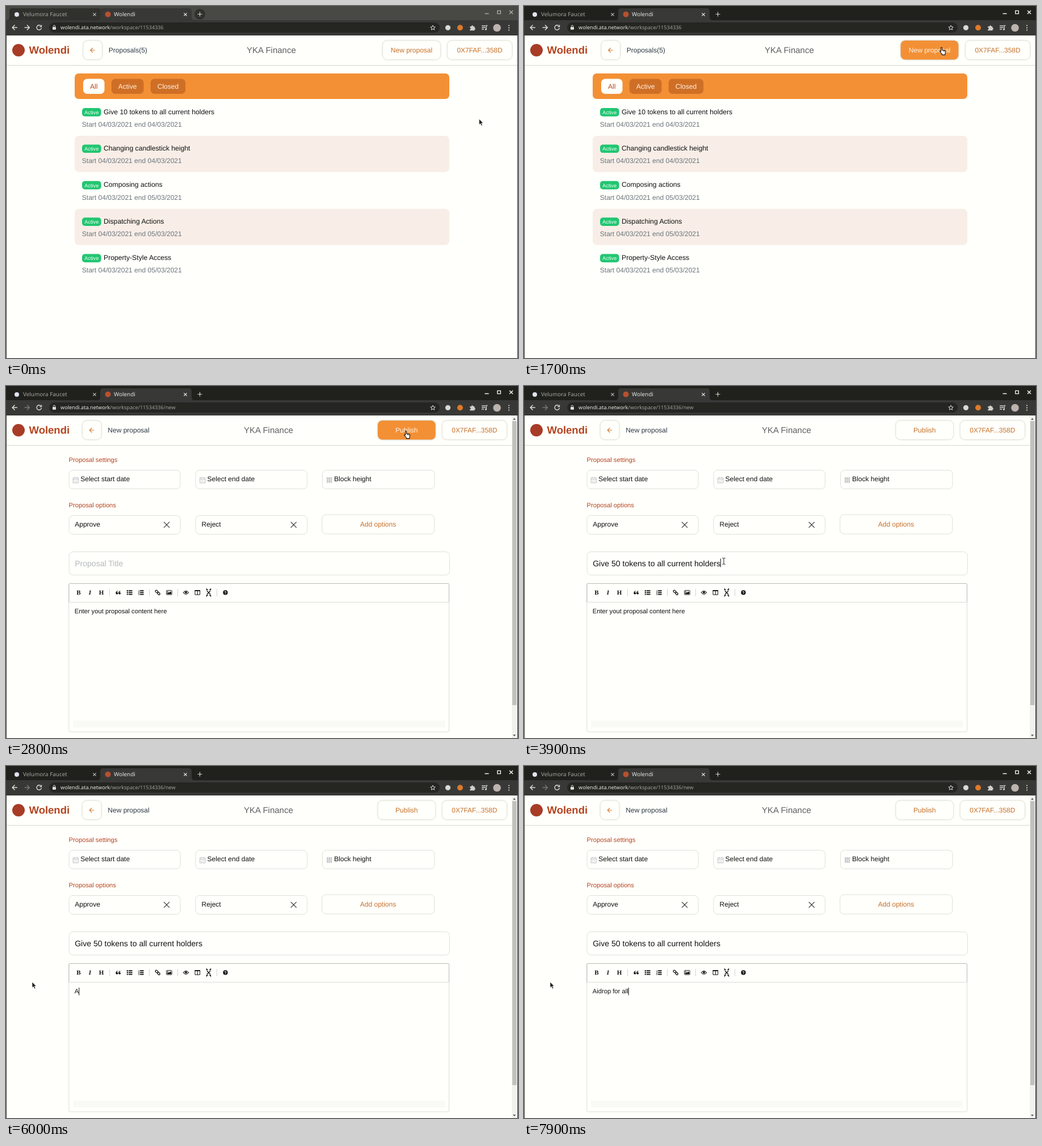
An HTML page for the animation above (8 s loop, 902 by 621 pixels).

```html
<!DOCTYPE html>
<html lang="en">
<head>
<meta charset="utf-8">
<title>Proposal workspace</title>
<style>
html, body { margin: 0; width: 100%; height: 100%; overflow: hidden; background: #fffffb; }
svg { display: block; width: 902px; height: 621px; font-family: "Liberation Sans", Arial, sans-serif; text-rendering: geometricPrecision; }
.ui { font-family: "Noto Sans", "Open Sans", sans-serif; }
.serif { font-family: "Liberation Serif", serif; font-weight: bold; }
</style>
</head>
<body>
<svg id="stage" viewBox="0 0 902 621" xmlns="http://www.w3.org/2000/svg"></svg>
<script>
const LOOP = 8000;
const PAGE = '#fffffb', RUST = '#b5431f', AMBER = '#c6702a', ORANGE = '#f39035', INK = '#111', GREY = '#6c757d';
const BRAND = 'Wolendi', WALLET = '0X7FAF...358D', ORG = 'YKA Finance';

// Drawing helpers
const rect = (x, y, w, h, r, fill, more = '') =>
  `<rect x="${x}" y="${y}" width="${w}" height="${h}" rx="${r}" fill="${fill}" ${more}/>`;
const text = (x, y, size, fill, label, more = '') =>
  `<text x="${x}" y="${y}" font-size="${size}" fill="${fill}" ${more}>${label}</text>`;
const line = (d, stroke, width = 1, more = '') =>
  `<path d="${d}" fill="none" stroke="${stroke}" stroke-width="${width}" ${more}/>`;
const shape = (d, fill, more = '') => `<path d="${d}" fill="${fill}" ${more}/>`;
const dot = (x, y, r, fill) => `<circle cx="${x}" cy="${y}" r="${r}" fill="${fill}"/>`;
const group = (id, body, more = '') => `<g id="${id}" ${more}>${body}</g>`;
const MIDDLE = 'text-anchor="middle"';

const cross = (x, y, r, color, width) =>
  line(`M${x - r} ${y - r}l${2 * r} ${2 * r}M${x + r} ${y - r}l${-2 * r} ${2 * r}`, color, width);
const arrow = (x, y, r, dir, color, width, id = '') =>
  line(`M${x - r * dir} ${y}H${x + r * dir}m${-r * dir} ${-r}l${r * dir} ${r}l${-r * dir} ${r}`, color, width, id);

function browser() {
  const light = '#dededa';
  const tab = shape('M161 25Q166 25 166 20V9Q166 4 171 4H322Q327 4 327 9V20Q327 25 332 25Z', '#383936');
  return rect(0, 0, 902, 52, 0, '#20211d', 'id="strip"') +
    group('idle', shape('M1 25Q6 25 6 20V9Q6 4 11 4H166V25Z', '#30312d') + dot(341.5, 14.5, 9.5, '#30312d')) +
    tab + rect(0, 25, 902, 27, 0, '#383936') +
    dot(19, 15, 4, '#dfe3ee') +
    text(30, 18, 9.9, '#a3a39e', 'Velumora Faucet', 'class="ui"') + cross(156, 15, 2.7, '#c4c4be', 1.1) +
    dot(179.5, 14.8, 5, '#b8502f') +
    text(190, 18, 9.9, '#e6e6e2', BRAND, 'class="ui"') + cross(316, 15, 2.7, '#eee', 1.2) +
    line('M337.5 14.5h8m-4-4v8', '#d0d0cc', 1.2) +
    group('winButtons', line('M843.5 13.5h7', 'currentColor', 1.5) +
      line('M865.8 8.4h5.5v5.2h-5.5z', 'currentColor', 1.4) + cross(890, 11, 3, 'currentColor', 1.5)) +
    arrow(15.5, 38, 4.4, -1, light, 1.4) + arrow(37, 38, 4.4, 1, light, 1.4, 'id="forward"') +
    line('M61.4 35.2a4.2 4.2 0 1 0 1 3.6M62.5 33.4v3.2h-3.2', light, 1.4) +
    rect(76, 29, 688, 18, 9, '#252622') +
    rect(82, 37, 6, 4.8, .7, light) + line('M83.4 37v-1.4a1.6 1.6 0 0 1 3.2 0V37', light, 1) +
    `<text class="ui" x="96" y="41.3" font-size="9.1" fill="#e6e6e2">${BRAND.toLowerCase()}.ata.network` +
    '<tspan id="path" fill="#a0a09b"></tspan></text>' +
    line('M752 34l1.2 2.8 3 .3-2.3 2 .7 3-2.6-1.6-2.6 1.6.7-3-2.3-2 3-.3z', light, 1) +
    dot(778.5, 38.3, 4.6, '#d8d8d4') + dot(800, 38.3, 5, '#dc7a2c') +
    shape('M817.2 36h2.6a1.7 1.7 0 0 1 3.4 0h2.2v2.4a1.6 1.6 0 0 1 0 3.2v1.6h-8.2v-2a1.6 1.6 0 0 0 0-3.2z', '#d0d0cb') +
    line('M838 35h7M838 38h7M838 41h4M846.3 41v-6.5h2', '#d0d0cb', 1.3) + dot(845.4, 41.2, 1.5, '#d0d0cb') +
    dot(865, 38.5, 6.8, '#bcb3af') + [34.5, 38.5, 42.5].map(y => dot(886, y, 1.1, light)).join('');
}

const softButton = (x, w) => rect(x, 61, w, 33.5, 8, PAGE, 'stroke="#e6e5df" filter="url(#soft)"');
const pill = (x, w, label, fill, color) =>
  rect(x, 128.5, w, 26.5, 7, fill) + text(x + w / 2, 145.7, 12, color, label, MIDDLE);

function header(shift, right, heading, action, actionX, walletX, hoverId, titleId) {
  const center = actionX + 50.8;
  return rect(0, 104, right, 1.2, 0, '#dedfda') + rect(0, 105, right, 1, 0, '#f3f3ef') +
    softButton(136 - shift, 33.5) + arrow(152.7 - shift, 78, 4, -1, '#cf7a30', 1.1) +
    text(180.8 - shift, 82, 12, '#2c3844', heading) +
    text(467.4 - (shift && 5), 82.6, 15, '#5e6062', ORG, `${MIDDLE} id="${titleId}"`) +
    softButton(actionX, 101.6) + text(center, 82, 12, AMBER, action, MIDDLE) +
    group(hoverId, rect(actionX, 61, 101.6, 33.5, 8, ORANGE, 'filter="url(#soft)"') +
      text(center, 82, 12, '#fff3e4', action, MIDDLE)) +
    softButton(walletX, 114) + text(walletX + 57, 82, 11.9, AMBER, WALLET, MIDDLE);
}

function listPage() {
  const items = [
    ['Give 10 tokens to all current holders', '04'], ['Changing candlestick height', '04'],
    ['Composing actions', '05'], ['Dispatching Actions', '05'], ['Property-Style Access', '05']
  ];
  const row = ([label, day], i) => {
    const y = 164.5 + i * 64.4;
    return (i % 2 ? rect(121, y, 660, 64, 7, '#f8eee7') : '') +
      rect(134, y + 15.5, 33.6, 14.7, 5, '#21c671') +
      text(150.8, y + 26.2, 9.2, '#effff4', 'Active', MIDDLE) +
      text(172, y + 26, 12.2, INK, label) +
      text(133.8, y + 48.2, 12.04, GREY, `Start 04/03/2021 end ${day}/03/2021`);
  };
  return header(0, 901, 'Proposals(5)', 'New proposal', 663.7, 777.5, 'newHover', 'listTitle') +
    rect(121, 119, 660, 45, 7, ORANGE) +
    pill(136, 37.5, 'All', '#fffffb', RUST) + pill(185.7, 56.8, 'Active', '#cf6f26', '#fff3e4') +
    pill(254.6, 61.6, 'Closed', '#cf6f26', '#fff3e4') + items.map(row).join('');
}

const field = (x, y, w, h) => rect(x, y, w, h, 7, PAGE, 'stroke="#dfe0da"');
const calendar = x => line(`M${x} 162h9.5v9h-9.5zM${x} 164.5h9.5M${x + 2.5} 160.5v2.5m4.5-2.5v2.5`, '#b9bec3', .9) +
  line(`M${x + 1.5} 167h7M${x + 1.5} 169.2h7`, '#b9bec3', .9, 'stroke-dasharray="1.3 1"');

function toolbar() {
  const quote = x => dot(x, 365.7, 1.9, INK) + line(`M${x - 1.3} 366q-.4-4 2.6-4.2`, INK, 1.2);
  const rows = [361.2, 364.4, 367.6];
  const list = (x, bullet) => rows.map((y, i) => bullet(x, y, i) + rect(x + 3, y - .9, 6.6, 1.8, 0, INK)).join('');
  const corner = (x, y) => shape(`M${357 + 4.2 * x} ${364.4 + 4.2 * y}h${-3.6 * x}l${3.6 * x} ${3.6 * y}z`, INK);
  return text(128, 368, 11, INK, 'B', `class="serif" ${MIDDLE}`) +
    text(148, 368, 11, INK, 'I', `class="serif" font-style="italic" ${MIDDLE}`) +
    text(168, 368, 11, INK, 'H', `class="serif" ${MIDDLE}`) +
    line('M182.5 358v13M252.5 358v13M302.5 358v13M371.5 358v13', '#d4d5d0') +
    quote(195.4) + quote(200.1) +
    list(213, (x, y) => dot(x + .9, y, 1.2, INK)) +
    list(233, (x, y, i) => text(x, y + 1.4, 4, INK, i + 1, 'font-weight="bold"')) +
    [[265.4, 362.5], [269, 366.1]].map(([x, y]) =>
      rect(x - 2.5, y - 1.6, 5, 3.2, 1.5, 'none', `stroke="${INK}" stroke-width="1.3" transform="rotate(45 ${x} ${y})"`)).join('') +
    rect(282.7, 360.7, 9.4, 7.4, .7, 'none', `stroke="${INK}" stroke-width="1"`) + dot(285, 363, 1, INK) +
    shape('M283.8 367v-1.5l2-1.6 1.2 1 2.2-2.6 2 2.2V367z', INK) +
    line('M312.4 364.5q4.6-6 9.2 0q-4.6 6-9.2 0z', INK, 1.1) + dot(317, 364.2, 1.9, INK) +
    line('M333 361h8.6v7.2H333zM337.3 361v7.2', INK, 1) + line('M332.5 361h9.6', INK, 1.8) +
    cross(357, 364.4, 3, INK, 1.4) + corner(1, 1) + corner(-1, 1) + corner(1, -1) + corner(-1, -1) +
    dot(386.5, 364.4, 4.1, INK) + text(386.5, 367, 7, '#fff', '?', `font-weight="bold" ${MIDDLE}`);
}

function formPage() {
  const grid = [0, 1, 2].flatMap(r => [0, 1, 2].map(c => rect(565 + c * 3.3, 161.3 + r * 3.3, 2.6, 2.6, 0, '#b9bec3'))).join('');
  return header(1.5, 891, 'New proposal', 'Publish', 655, 768.3, 'publishHover', 'formTitle') +
    text(110.6, 134.2, 11.2, RUST, 'Proposal settings') +
    field(111, 148.5, 196, 33) + field(334, 148.5, 196.5, 33) + field(557.5, 148.5, 197.5, 33) +
    calendar(118) + calendar(341.5) + grid +
    text(131.2, 168.3, 12.04, INK, 'Select start date') + text(354.6, 168.3, 12.04, INK, 'Select end date') +
    text(578, 168.3, 12.04, INK, 'Block height') +
    text(110.6, 214, 11.2, RUST, 'Proposal options') +
    field(111, 228.5, 196, 33) + field(334, 228.5, 196.5, 33) + field(556.7, 227, 198, 34) +
    text(121.2, 248.2, 12.04, INK, 'Approve') + text(344.6, 248.2, 12.04, INK, 'Reject') +
    cross(283, 244.8, 5, '#333', 1.2) + cross(506.7, 244.8, 5, '#333', 1.2) +
    text(655.5, 247.5, 12.04, AMBER, 'Add options', MIDDLE) +
    field(111, 292.5, 670.5, 41) + text(121.2, 317.5, 14.06, INK, '', 'id="titleText"') +
    rect(110.8, 348.5, 669.7, 261.5, 2, PAGE, 'stroke="#dcddd8"') +
    line('M110.8 381V350.5q0-2 2-2H778.5q2 0 2 2V381', '#b9bab6') + line('M111 381.5H780.5', '#dcddd8') + toolbar() +
    rect(118, 590, 655.5, 12.5, 0, '#f9f9f5') +
    rect(121, 391, 0, 13.5, 0, '#d8d9d5', 'id="selection"') +
    text(120.7, 401.2, 11.23, INK, '', 'id="bodyText"') +
    rect(0, 0, 1, 15, 0, INK, 'id="caret"') +
    rect(891, 52, 10, 569, 0, '#f1f1ee') + rect(892, 62, 7.5, 501, 0, '#c1c1be') +
    shape('M893 59.5h5l-2.5-3z', '#555') + shape('M893 615h5l-2.5 3z', '#555');
}

const pointers =
  group('arrow', shape('M0 0V10.2L2.4 8.1 4.1 12 5.9 11.2 4.2 7.4H7.3Z', '#222', 'stroke="#fff" stroke-width=".6"')) +
  group('hand', shape('M-1.5 0q1-1 2 0V4.2l5 .9q1.3.4 1.2 1.6L6 10.2V12.6H.3V11L-3.2 7.2q-.5-1.4 1-1.3l.8.7z', '#fff',
    'stroke="#111" stroke-width="1.1" stroke-linejoin="round"') + line('M2.3 5v2M4.4 5.4v2', '#111', .7)) +
  group('beam', line('M-2.6-5.6Q0-5.6 0-4.5Q0-5.6 2.6-5.6M0-5V5M-2.6 5.6Q0 5.6 0 4.5Q0 5.6 2.6 5.6', '#222', 1));

const stage = document.getElementById('stage');
stage.innerHTML = '<defs><filter id="soft" x="-20%" y="-30%" width="140%" height="160%">' +
  '<feDropShadow dx="0" dy="0" stdDeviation="1.3" flood-color="#555" flood-opacity=".22"/></filter></defs>' +
  rect(0, 0, 902, 621, 0, PAGE) + browser() +
  dot(22, 78, 11, '#a83c26') + text(40.5, 84, 18.5, RUST, BRAND, 'font-weight="bold"') +
  group('list', listPage()) + group('form', formPage()) +
  rect(0, 52, 1, 569, 0, '#33342f') + rect(901, 52, 1, 569, 0, '#33342f') + pointers;

const el = id => document.getElementById(id);
const show = (id, on) => el(id).setAttribute('display', on ? 'inline' : 'none');
const set = (id, attrs) => Object.entries(attrs).forEach(([k, v]) => el(id).setAttribute(k, v));
const setText = (id, value) => { if (el(id).textContent !== value) el(id).textContent = value; };

// Each track holds a value from its start time until the next entry.
const pointerTrack = [
  [0, 'arrow', 833.4, 199.3], [700, 'arrow', 822, 178], [800, 'arrow', 778, 118], [900, 'hand', 743, 80], [1000, 'hand', 736, 73.5],
  [2800, 'hand', 705, 80], [2900, 'arrow', 560, 168], [3000, 'arrow', 436.5, 250.5], [3200, 'beam', 355, 304],
  [3500, 'beam', 352, 309], [4400, 'beam', 356, 338], [4500, 'beam', 362, 409], [4800, 'beam', 362, 413],
  [5000, 'beam', 326, 410], [5100, 'beam', 190, 396], [5200, 'arrow', 83.6, 380], [5300, 'arrow', 56, 379], [5400, 'arrow', 46, 381]
];
const newHoverTrack = [[0, 0], [900, .5], [1000, 1]];
const publishTrack = [[0, 1], [2900, .45], [3000, 0]];
const selectTrack = [[0, 284], [5100, 190], [5200, 120.7], [6000, 284]];
const bodyTrack = [
  [0, 'Enter yout proposal content here'], [6000, 'A'], [6300, 'Ai'], [6500, 'Aidr'], [6600, 'Aidro'], [6700, 'Aidrop'],
  [6800, 'Aidrop '], [7000, 'Aidrop fr'], [7100, 'Aidrop fro'], [7300, 'Aidrop fr'], [7400, 'Aidrop f'], [7500, 'Aidrop fo'],
  [7600, 'Aidrop for '], [7700, 'Aidrop for a'], [7800, 'Aidrop for al'], [7900, 'Aidrop for all']
];
const at = (track, t) => track.findLast(entry => entry[0] <= t);
el('bodyText').style.whiteSpace = 'pre';

function placeCaret(t) {
  const inBody = t >= 6000;
  show('caret', inBody || (t >= 3500 && t < 4500));
  const width = inBody ? el('bodyText').getComputedTextLength() : t < 3900 ? 0 : el('titleText').getComputedTextLength();
  set('caret', inBody ? { x: 120.7 + width, y: 391, height: 13.5 } : { x: 121 + width, y: 304.5, height: 15 });
}

function render(time) {
  const t = Math.floor(time / 100) * 100;
  const focused = t >= 1700, onForm = t >= 1800;
  set('strip', { fill: focused ? '#20211d' : '#484944' });
  show('idle', !focused);
  set('winButtons', { color: focused ? '#f2f2ee' : '#a9aaa4' });
  set('forward', { stroke: onForm ? '#777873' : '#dededa' });
  setText('path', '/workspace/11534336' + (onForm ? '/new' : ''));
  show('list', !onForm);
  show('form', onForm);
  set('newHover', { opacity: at(newHoverTrack, t)[1] });
  set('publishHover', { opacity: at(publishTrack, t)[1] });
  set('formTitle', { opacity: Math.min(1, Math.max(0, (t - 1780) / 600)) });

  const titled = t >= 3900;
  setText('titleText', titled ? 'Give 50 tokens to all current holders' : 'Proposal Title');
  set('titleText', { fill: titled ? INK : '#b5b9bd' });
  setText('bodyText', at(bodyTrack, t)[1]);
  const from = at(selectTrack, t)[1];
  set('selection', { x: from, width: 284 - from });
  placeCaret(t);

  const [, kind, x, y] = at(pointerTrack, t);
  for (const id of ['arrow', 'hand', 'beam']) show(id, id === kind);
  set(kind, { transform: `translate(${x} ${y})` });
}

const start = performance.now();
function tick() {
  render((performance.now() - start) % LOOP);
  requestAnimationFrame(tick);
}
tick();
</script>
</body>
</html>
```
